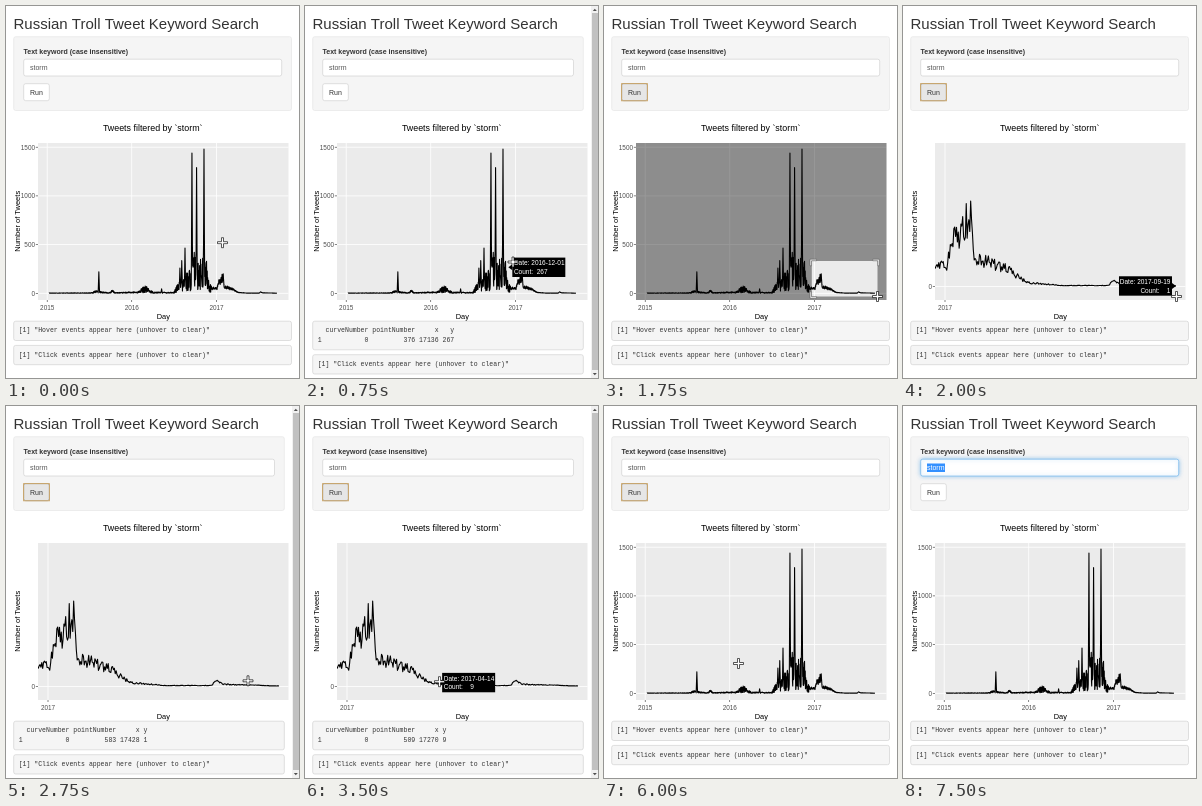
Recreate the animation shown at these times as an HTML page with a canvas. Size 293 by 372 pixels, loop 8000 ms.

```html
<!DOCTYPE html>
<html lang="en">
<head>
<meta charset="utf-8">
<title>Keyword search</title>
<style>
html, body { margin: 0; width: 100%; height: 100%; overflow: hidden; background: #fff; }
canvas { display: block; width: 293px; height: 372px; }
</style>
</head>
<body>
<canvas id="stage"></canvas>
<script>
const W = 293, H = 372, LOOP = 8000;
const SANS = '"Liberation Sans", Arial, sans-serif';
const MONO = '"Liberation Mono", "Courier New", monospace';
const KEYWORD = 'storm';
const PLOT = { x: 32, y: 137, w: 250.5, h: 157 };
// Pixel place of 1 Jan 2017 at zero, then pixels per day and per tweet
const FULL = { x: 210.5, y: 287.3, day: .2316, count: .0974 };
const ZOOM = { x: 42, y: 280.4, day: .885, count: .4247 };

const canvas = document.getElementById('stage');
const ctx = canvas.getContext('2d');
const ratio = window.devicePixelRatio || 1;
canvas.width = W * ratio;
canvas.height = H * ratio;

// ---- data: days since 1 Jan 2017 and tweet counts ----
const FIRST_DAY = -723, LAST_DAY = 261;
const trend = [
  [FIRST_DAY, 2], [-546, 3], [-520, 15], [-464, 3], [-449, 20], [-438, 4], [-339, 10],
  [-309, 45], [-274, 8], [-184, 6], [-166, 60], [-114, 140], [-97, 240], [-41, 190],
  [-28, 50], [2, 50], [10, 108], [29, 172], [31, 108], [35, 62], [61, 52], [93, 9],
  [133, 2], [184, 2], [191, 14], [198, 5], [LAST_DAY, 1]
];
const spikes = [
  [-508, 220], [-237, 45], [-158, 260], [-150, 335], [-136, 465], [-106, 1440],
  [-86, 1290], [-54, 1480]
];

function seeded(seed) {
  return () => {
    seed = (seed * 1664525 + 1013904223) % 4294967296;
    return seed / 4294967296;
  };
}

function trendAt(day) {
  const i = Math.max(1, trend.findIndex(([d]) => d >= day));
  const [[d0, c0], [d1, c1]] = [trend[i - 1], trend[i]];
  return c0 + (c1 - c0) * (day - d0) / (d1 - d0);
}

function buildSeries() {
  const random = seeded(17), points = [];
  for (let day = FIRST_DAY; day <= LAST_DAY; day++) {
    const spread = day < -20 ? .85 : .3;
    let count = trendAt(day) * (1 + spread * (2 * random() - 1));
    for (const [d, peak] of spikes) count = Math.max(count, peak * (1 - Math.abs(day - d) / 3));
    points.push([day, count]);
  }
  return points;
}
const series = buildSeries();

const place = (view, day, count) => [view.x + day * view.day, view.y - count * view.count];

// ---- timeline ----
const HOVER = ['[1] "Hover events appear here (unhover to clear)"'];
const CLICK = ['[1] "Click events appear here (unhover to clear)"'];
const JAN_2017 = 17167;   // days since 1970

const december = { index: 376, day: -31, count: 267 };
const september = { index: 583, day: 261, count: 1, left: true };
const april14 = { index: 509, day: 103, count: 9 };
const april15 = { index: 510, day: 104, count: 4 };

const row = ({ index, day, count }) => [
  '  curveNumber pointNumber     x ' + 'y'.padStart(String(count).length),
  `1           0         ${index} ${JAN_2017 + day} ${count}`
];
const cross = (x, y) => ({ cursor: ['cross', x, y] });
const drag = (x, y) => ({ drag: [x, y], ...cross(x, y) });

const steps = [
  [0, { ...cross(216.5, 236.7), view: FULL, hover: HOVER, click: CLICK,
        tip: null, drag: null, focus: '' }],
  [250, cross(210.5, 244.5)],
  [500, { ...cross(208, 256), tip: december }],
  [750, { hover: row(december) }],
  [1000, { ...drag(225.3, 273.5), hover: HOVER, tip: null, focus: 'run' }],
  [1250, drag(234.5, 281.5)],
  [1500, drag(262.5, 288.5)],
  [1750, drag(273.5, 290.5)],
  [2000, { drag: null, view: ZOOM, tip: september }],
  [2250, { hover: row(september) }],
  [2750, { ...cross(242, 274.8), tip: null }],
  [3000, { ...cross(160.5, 256.5), hover: HOVER }],
  [3250, cross(153.5, 261.5)],
  [3500, { ...cross(134.5, 275.7), tip: april14, hover: row(april14) }],
  [3750, cross(134.5, 276.4)],
  [4000, { ...cross(134.5, 278.5), tip: april15, hover: row(april15) }],
  [4250, { click: row(april15) }],
  [5500, { ...cross(134.5, 257.5), tip: null, hover: HOVER }],
  [6000, { view: FULL, click: CLICK }],
  [6250, { cursor: ['arrow', 72.3, 112] }],
  [6500, { cursor: ['arrow', 71.3, 74] }],
  [6750, { cursor: ['beam', 72.5, 66.5] }],
  [7000, { cursor: ['beam', 72.5, 63.5] }],
  [7250, { focus: 'input' }],
  [7500, { focus: 'selected', cursor: null }]
];
const stateAt = time =>
  Object.assign({}, ...steps.filter(([start]) => start <= time).map(([, change]) => change));

// ---- drawing helpers ----
function text(str, x, y, size, color, { align = 'left', font = SANS, weight = '' } = {}) {
  ctx.font = `${weight} ${size}px ${font}`;
  ctx.textAlign = align;
  ctx.fillStyle = color;
  ctx.fillText(str, x, y);
}

function rect(x, y, w, h, color) {
  ctx.fillStyle = color;
  ctx.fillRect(x, y, w, h);
}

function paint(fill, stroke, width) {
  ctx.fillStyle = fill;
  ctx.fill();
  if (!stroke) return;
  ctx.strokeStyle = stroke;
  ctx.lineWidth = width;
  ctx.stroke();
}

function box(x, y, w, h, fill, stroke) {
  ctx.beginPath();
  ctx.roundRect(x, y, w, h, 2);
  paint(fill, stroke, .6);
}

function polygon(points) {
  ctx.beginPath();
  points.forEach(([x, y]) => ctx.lineTo(x, y));
  ctx.closePath();
}

// ---- page parts ----
function drawForm(focus, right) {
  text('Russian Troll Tweet Keyword Search', 7.5, 22.5, 15, '#333');
  box(7.7, 30.7, right - 7.7, 73.8, '#f5f5f5', '#e3e3e3');
  text('Text keyword (case insensitive)', 17.5, 48, 7, '#333', { weight: 'bold' });

  const selected = focus === 'selected', editing = selected || focus === 'input';
  ctx.save();
  if (editing) {
    ctx.shadowColor = 'rgba(102,175,233,.7)';
    ctx.shadowBlur = (selected ? 4 : 2) * ratio;
  }
  box(17.7, 53.2, right - 27.5, 16.8, '#fff', editing ? '#66afe9' : '#ccc');
  ctx.restore();
  if (selected) rect(24, 57.5, 18, 8.5, '#3390ff');
  text(KEYWORD, 24, 64.2, 7, selected ? '#fff' : '#555');
  if (focus === 'input') rect(42.2, 57.5, .6, 8.5, '#555');

  const run = focus === 'run';
  box(17.7, 77.7, 25.6, 17, run ? '#e6e6e6' : '#fff', run ? '#8c8c8c' : '#ccc');
  if (run) {
    ctx.strokeStyle = '#c9a262';
    ctx.lineWidth = .9;
    ctx.strokeRect(17.6, 77.6, 25.8, 17.2);
  }
  text('Run', 24, 88.7, 7, '#333');
}

function drawAxes(view) {
  const { x, y, w, h } = PLOT;
  rect(x, y, w, h, '#ebebeb');
  for (const year of [2015, 2016, 2017]) {
    const [tx] = place(view, (Date.UTC(year, 0) - Date.UTC(2017, 0)) / 864e5, 0);
    if (tx < x) continue;
    rect(tx - .4, y, .8, h, '#fff');
    rect(tx - .3, y + h, .6, 2, '#333');
    text(year, tx, 304, 6.4, '#4d4d4d', { align: 'center' });
  }
  for (let count = 0; count <= 1500; count += 500) {
    const [, ty] = place(view, 0, count);
    if (ty < y) continue;
    rect(x, ty - .4, w, .8, '#fff');
    rect(x - 2.2, ty - .3, 2.2, .6, '#333');
    text(count, 29, ty + 2.4, 6.4, '#4d4d4d', { align: 'right' });
  }
  text(`Tweets filtered by \`${KEYWORD}\``, 146.7, 125.4, 8.9, '#000', { align: 'center' });
  text('Day', 157.3, 313, 7.4, '#000', { align: 'center' });
  ctx.save();
  ctx.translate(13.7, 215.3);
  ctx.rotate(-Math.PI / 2);
  text('Number of Tweets', 0, 0, 7.5, '#000', { align: 'center' });
  ctx.restore();
}

function drawSeries(view) {
  ctx.save();
  ctx.beginPath();
  ctx.rect(PLOT.x, PLOT.y, PLOT.w, PLOT.h);
  ctx.clip();
  ctx.beginPath();
  for (const [day, count] of series) ctx.lineTo(...place(view, day, count));
  ctx.strokeStyle = '#000';
  ctx.lineWidth = 1.1;
  ctx.lineJoin = 'round';
  ctx.stroke();
  ctx.restore();
}

function drawSelection(l, t, r, b) {
  ctx.beginPath();
  ctx.rect(PLOT.x, PLOT.y, PLOT.w, PLOT.h);
  ctx.rect(l, t, r - l, b - t);
  ctx.fillStyle = 'rgba(0,0,0,.4)';
  ctx.fill('evenodd');
  const gap = .25, far = 1.75, arm = -4.75;
  const corner = [[far, arm], [gap, arm], [gap, gap], [arm, gap], [arm, far], [far, far]];
  for (const [cx, dx] of [[l, -1], [r, 1]]) {
    for (const [cy, dy] of [[t, -1], [b, 1]]) {
      polygon(corner.map(([x, y]) => [cx + x * dx, cy + y * dy]));
      paint('#fff', '#444', .5);
    }
  }
}

function drawTip({ day, count, left }, view) {
  const [x, y] = place(view, day, count);
  const dir = left ? -1 : 1, edge = x + 4 * dir, w = 53;
  const date = new Date(Date.UTC(2017, 0, 1 + day)).toISOString().slice(0, 10);
  rect(left ? edge - w : edge, y - 9.7, w, 19.4, '#000');
  polygon([[x, y], [edge, y - 3], [edge, y + 3]]);
  paint('#000');
  const align = left ? 'right' : 'left', tx = edge + 1.6 * dir;
  text(`Date: ${date}`, tx, y - 1.8, 6.5, '#fff', { align });
  text(`Count: ${String(count).padStart(4, '\u00a0')}`, tx, y + 6.9, 6.5, '#fff', { align });
}

function drawOutput(lines, y, right) {
  const h = 10 + lines.length * 9.3;
  box(7.7, y, right - 7.7, h, '#f5f5f5', '#ccc');
  lines.forEach((line, i) => text(line, 12.7, y + 11.1 + i * 9.3, 6.5, '#333', { font: MONO }));
  return y + h + 4.9;
}

function drawScrollbar(end) {
  rect(286, 0, 7, H, '#f1f1f1');
  rect(287, 7, 6, end - 7, '#c1c1c1');
  for (const [base, tip] of [[5, 2.7], [367, 369.3]]) {
    polygon([[287.8, base], [291.8, base], [289.8, tip]]);
    paint('#505050');
  }
}

const pointers = {
  cross() {
    const a = 5, b = 1;
    polygon([[-b, -a], [b, -a], [b, -b], [a, -b], [a, b], [b, b],
             [b, a], [-b, a], [-b, b], [-a, b], [-a, -b], [-b, -b]]);
    paint('#fff', '#000', .65);
  },
  arrow() {
    polygon([[0, 0], [0, 9], [2, 7.2], [3.4, 10.4], [4.8, 9.8], [3.5, 6.7], [6.3, 6.5]]);
    paint('#000', '#fff', .6);
  },
  beam() {
    rect(-.4, -4.2, .8, 8.4, '#000');
    rect(-2, -4.4, 4, .7, '#000');
    rect(-2, 3.7, 4, .7, '#000');
  }
};

function draw(time) {
  const { view, hover, click, tip, drag, focus, cursor } = stateAt(time);
  const extraLines = hover.length + click.length - 2;
  const right = extraLines ? 278.3 : 285.5;
  ctx.setTransform(ratio, 0, 0, ratio, 0, 0);
  rect(0, 0, W, H, '#fff');
  drawForm(focus, right);
  drawAxes(view);
  drawSeries(view);
  if (drag) drawSelection(207.8, 255, ...drag);
  drawOutput(click, drawOutput(hover, 315.2, right), right);
  if (extraLines) drawScrollbar(373 - 9 * extraLines);
  if (tip) drawTip(tip, view);
  if (cursor) {
    const [kind, x, y] = cursor;
    ctx.translate(x, y);
    pointers[kind]();
  }
}

const start = performance.now();
function tick() {
  draw((performance.now() - start) % LOOP);
  requestAnimationFrame(tick);
}
tick();
</script>
</body>
</html>
```
